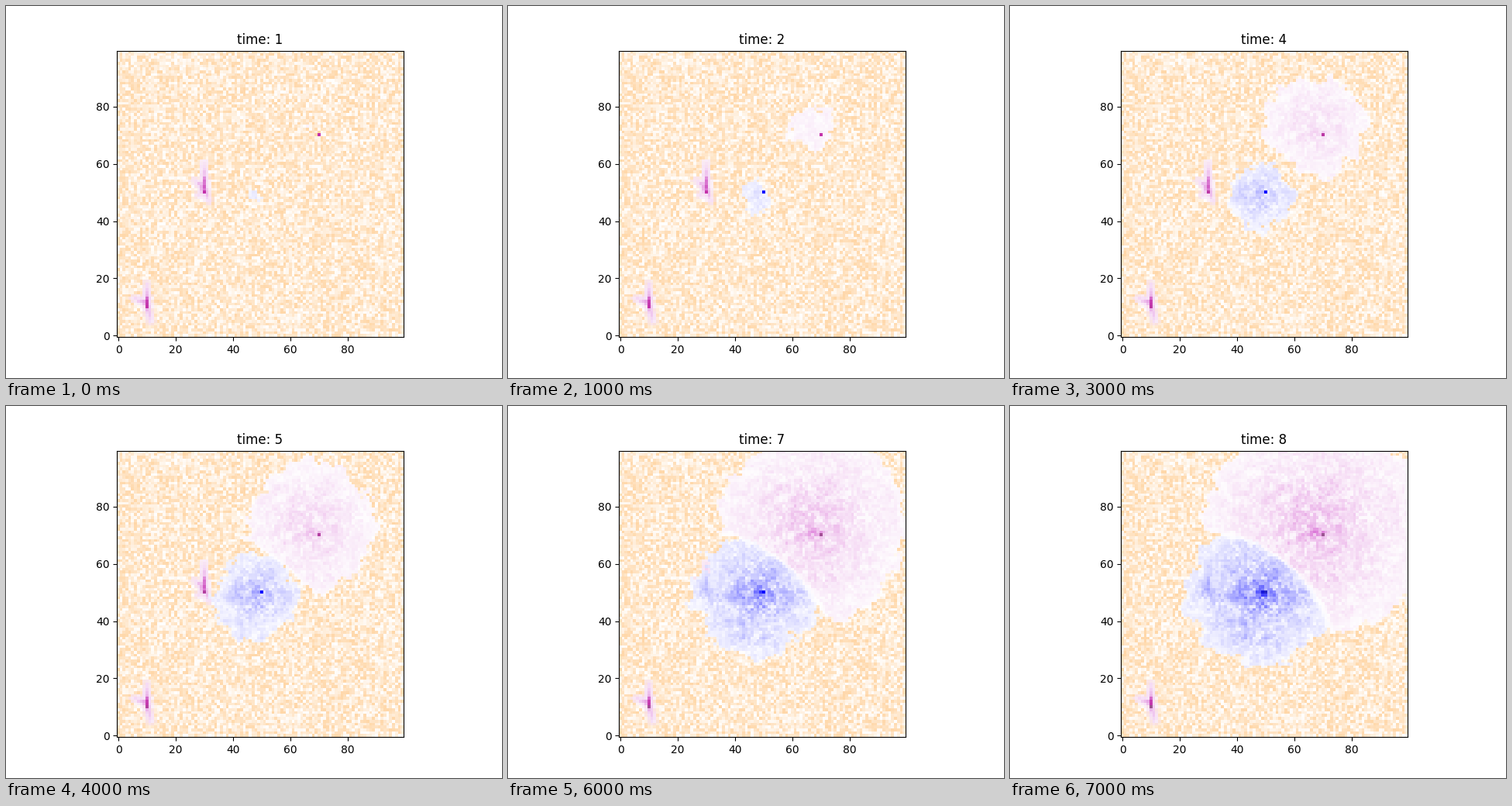
These frames come from a looping animation (640x480 px, 8 s). A matplotlib script:

```python
import matplotlib.pyplot as plt
import numpy as np
from matplotlib.animation import FuncAnimation

N = 100
STEPS = 8
rng = np.random.default_rng(7)
Y, X = np.mgrid[0:N, 0:N].astype(float)

WHITE = np.ones((N, N, 3))
SAND = np.array([255, 215, 168]) / 255
ORCHID = np.array([218, 112, 214]) / 255
MAGENTA = np.array([195, 50, 170]) / 255
DUSK = np.array([155, 85, 145]) / 255
BLUE = np.array([0.0, 0.0, 1.0])
SLATE = np.array([0.35, 0.35, 0.5])

PINK_SEEDS = [(30, 50), (10, 10), (70, 70)]


def mix(base, color, amount):
    a = np.clip(amount, 0, 1)[..., None]
    return base * (1 - a) + color * a


def spot(x, y, width, height=None):
    return np.exp(-((X - x) / width) ** 2 / 2 - ((Y - y) / (height or width)) ** 2 / 2)


def clumps(rounds):
    """Smooth seeded noise with mean 0 and spread 1."""
    field = rng.normal(0, 1, (N, N))
    for _ in range(rounds):
        for axis in (0, 1):
            field = (np.roll(field, 1, axis) + field + np.roll(field, -1, axis)) / 3
    return (field - field.mean()) / field.std()


def distances(x, y):
    """Plain distance from a seed, and one with a ragged edge."""
    d = np.hypot(X - x, Y - y)
    return d, d + 1.2 * clumps(4) + rng.normal(0, 0.6, (N, N))


def grain():
    return np.clip(rng.uniform(0.5, 1.5, (N, N)) + 0.25 * clumps(1), 0.2, 2)


def colony(x, y, tips):
    """Limbs that fade from a root to their tips, inside a pale halo."""
    density = np.zeros((N, N))
    for tx, ty in tips:
        dx, dy = tx - x, ty - y
        s = np.clip(((X - x) * dx + (Y - y) * dy) / (dx * dx + dy * dy), 0, 1)
        gap = np.hypot(X - x - s * dx, Y - y - s * dy)
        limb = np.exp(-(gap / 0.85) ** 2 - 1.7 * s)
        halo = 0.32 * np.exp(-(gap / 1.7) ** 2 - 0.6 * s)
        density = np.maximum(density, np.maximum(limb, halo))
    return np.where(density > 0.06, density * rng.uniform(0.8, 1.2, (N, N)), 0)


def grow_colony(img, density):
    img = mix(img, np.ones(3), 6 * density)
    img = mix(img, ORCHID, 1.15 * density)
    return mix(img, MAGENTA, 1.6 * (density - 0.5))


sand = mix(WHITE, SAND, rng.uniform(0, 1, (N, N)))
blue_d, blue_front = distances(47.8, 49.2)
pink_d, pink_front = distances(67, 73)
blue_grain, pink_grain = grain(), grain()

# Each cell belongs to the front that claims it first
margin = pink_d / 5.3 + 1.2 - blue_d / 3.4 + rng.normal(0, 0.08, (N, N))
blue_side = margin > 0
edge_fade = np.clip(np.abs(margin) / 0.5, 0.2, 1)

upper = colony(30, 51.7, [(30, 60), (30, 50), (26.5, 54), (28, 49), (31.5, 47)])
lower = colony(10, 11.3, [(10, 18), (5.5, 13), (11.3, 5)])
colonies = np.maximum(upper, lower)


def picture(step):
    t = step + 1
    late = max(t - 3, 0) / 5
    img = sand.copy()

    depth = 2.2 + 5.15 * step - pink_front
    taken = (depth > 0) & ~blue_side
    amount = (0.06 + 0.0058 * depth) * pink_grain * edge_fade
    amount += late * pink_grain * (0.28 * spot(67.5, 71, 2.6, 1.4) + 0.08 * spot(65, 74, 8))
    img[taken] = mix(WHITE, ORCHID, amount)[taken]

    depth = 1.5 + 3.35 * step - blue_front
    taken = (depth > 0) & blue_side
    amount = (0.05 + 0.0088 * depth) * blue_grain * edge_fade
    amount += late * 0.15 * spot(49, 50, 4) * blue_grain + 0.3 * late * upper
    amount += 0.09 * 1.9 ** (t - 4) * spot(49.7, 49.7, 0.7)
    amount[50, 50] = max(amount[50, 50], 1)
    blue = mix(mix(WHITE, BLUE, amount), SLATE, 1.6 * (amount - 1))
    img[taken] = blue[taken]

    img = grow_colony(img, np.where(taken, 0, colonies))
    for x, y in PINK_SEEDS:
        if not taken[y, x]:
            img[y, x] = MAGENTA + (DUSK - MAGENTA) * late
    return np.clip(img, 0, 1)


fig, ax = plt.subplots(figsize=(6.4, 4.8), dpi=100)
view = ax.imshow(picture(0), origin="lower", interpolation="nearest")
title = ax.set_title("time: 1")


def update(step):
    view.set_data(picture(step))
    title.set_text(f"time: {step + 1}")
    return view, title


anim = FuncAnimation(fig, update, frames=STEPS, interval=1000, repeat=True,
                     repeat_delay=0, blit=False)
plt.show()
```
